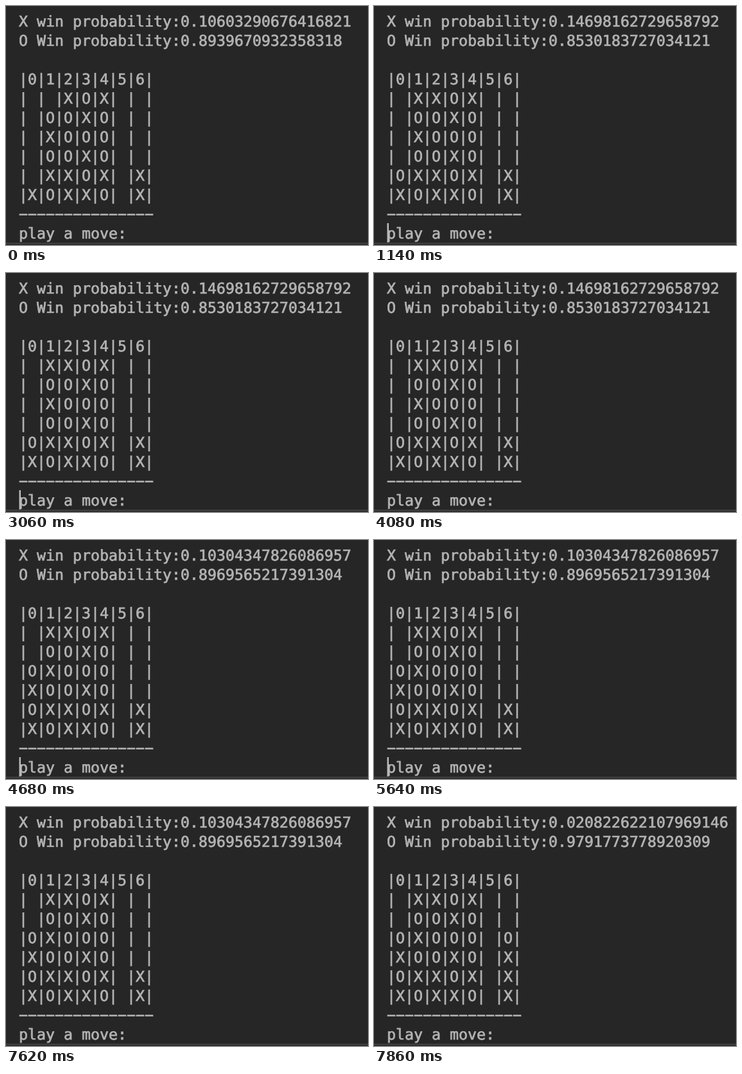
Write an HTML page that moves like this. It is 564 px wide and 372 px high and loops after 8 s.

```html
<!DOCTYPE html>
<html lang="en">
<head>
<meta charset="utf-8">
<title>Four in a row console</title>
<style>
  html, body { margin: 0; width: 100%; height: 100%; overflow: hidden; background: #262626; }
  svg { display: block; }
  text {
    font: 23.25px "DejaVu Sans Mono", monospace; white-space: pre;
    fill: #b4b4b4; stroke: #b4b4b4; stroke-width: 0.7px;
    text-rendering: geometricPrecision;
  }
</style>
</head>
<body>
<svg id="stage" width="564" height="372" viewBox="0 0 564 372">
  <rect width="564" height="372" fill="#262626"/>
  <rect y="368.5" width="564" height="2" fill="#464444"/>
  <g id="lines"></g>
  <rect id="caret" y="338" width="2.5" height="30" fill="#bcbcbc"/>
</svg>
<script>
const LOOP = 8000, LEFT = 20, CHAR = 14, LINE = 30, BASE = 31.6;
const PROMPT = 'play a move:';

// Columns are listed from the bottom up.
const positions = [
  { from: 0, x: '0.10603290676416821', o: '0.8939670932358318',
    columns: ['X', 'OXOXO', 'XXOOOX', 'XOXOXO', 'OXOOOX', '', 'XX'] },
  { from: 1080, x: '0.14698162729658792', o: '0.8530183727034121', moves: [1, 0] },
  { from: 4680, x: '0.10304347826086957', o: '0.8969565217391304', moves: [0, 0] },
  { from: 7800, x: '0.020822622107969146', o: '0.9791773778920309', moves: [6, 6] }
];

// X drops first, then O answers.
for (let i = 1; i < positions.length; i++) {
  const columns = positions[i - 1].columns.slice();
  positions[i].moves.forEach((col, turn) => { columns[col] += 'XO'[turn]; });
  positions[i].columns = columns;
}

const typed = { from: 4380, to: 4680, key: '0' };

// The caret flips at each of these times, starting hidden.
const flips = [120, 240, 300, 420, 600, 720, 900, 1020, 1140, 1200, 1380, 1500, 1560, 1680];
const blink = (from, to) => {
  for (let t = from; t <= to; t += 300) flips.push(t, t + 120);
};
blink(1860, 3960);
flips.push(4260, 4440, 4680, 4800, 4920, 5040, 5220, 5340, 5460, 5520, 5640);
blink(5820, 7320);
flips.push(7620, 7800, 7860);

const row = cells => '|' + cells.join('|') + '|';

function screen(p) {
  const rows = [5, 4, 3, 2, 1, 0].map(h => row(p.columns.map(c => c[h] || ' ')));
  return [
    'X win probability:' + p.x,
    'O Win probability:' + p.o,
    '',
    row([0, 1, 2, 3, 4, 5, 6]),
    ...rows,
    '\u2212'.repeat(15),
    PROMPT
  ];
}

const group = document.getElementById('lines');
const caret = document.getElementById('caret');
const lines = Array.from({ length: 12 }, (_, i) => {
  const line = document.createElementNS('http://www.w3.org/2000/svg', 'text');
  line.setAttribute('x', LEFT);
  line.setAttribute('y', BASE + i * LINE);
  return group.appendChild(line);
});

function draw(t) {
  const content = screen(positions.filter(p => p.from <= t).pop());
  const typing = t >= typed.from && t < typed.to;
  if (typing) content[11] += typed.key;
  content.forEach((s, i) => {
    if (lines[i].textContent !== s) lines[i].textContent = s;
  });
  const column = typing ? PROMPT.length + 1 : 0;
  const shown = flips.filter(f => f <= t).length % 2;
  caret.setAttribute('x', LEFT + column * CHAR + 0.5);
  caret.setAttribute('visibility', shown ? 'visible' : 'hidden');
}

const start = performance.now();
function tick() {
  draw((performance.now() - start) % LOOP);
  requestAnimationFrame(tick);
}
draw(0);
requestAnimationFrame(tick);
</script>
</body>
</html>
```
